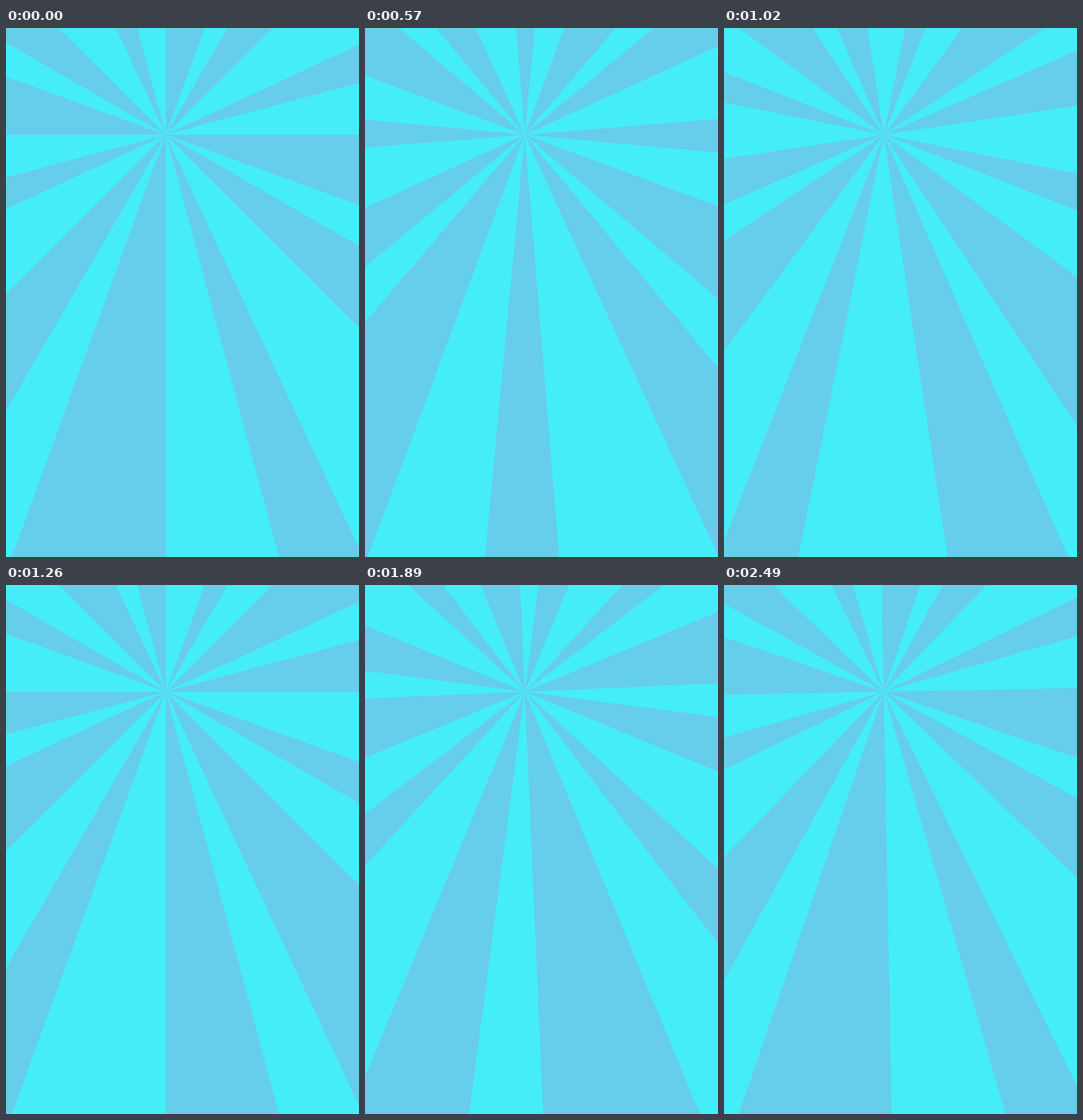
Recreate the animation shown at these times as an HTML page with a canvas. Size 611x917 px, loop 2.52 s.

```html
<!DOCTYPE html>
<html lang="en">
<head>
<meta charset="utf-8">
<title>Sunburst</title>
<style>
  html, body { margin: 0; width: 100%; height: 100%; overflow: hidden; background: #66cdeb; }
  canvas { display: block; }
</style>
</head>
<body>
<canvas id="stage" width="611" height="917"></canvas>
<script>
const ctx = document.getElementById('stage').getContext('2d');
const WIDTH = 611, HEIGHT = 917;
const CENTER = { x: 276.5, y: 185 };
const RADIUS = 1200;
const LOOP = 2520, STEP = 30;
const BLUE = '#66cdeb', CYAN = '#45edf8';

// Bright rays as [start, end] degrees; the set repeats every quarter turn.
const RAYS = [[20, 30], [45, 65], [75, 90]];
const QUARTER = 90;

const rad = degrees => degrees * Math.PI / 180;

function addRay(from, to) {
  ctx.moveTo(CENTER.x, CENTER.y);
  for (const angle of [rad(from), rad(to)]) {
    ctx.lineTo(CENTER.x + RADIUS * Math.cos(angle), CENTER.y + RADIUS * Math.sin(angle));
  }
  ctx.closePath();
}

function draw(time) {
  const turn = QUARTER * time / LOOP;
  ctx.fillStyle = BLUE;
  ctx.fillRect(0, 0, WIDTH, HEIGHT);
  ctx.fillStyle = CYAN;
  ctx.beginPath();
  for (let base = turn; base < turn + 360; base += QUARTER) {
    for (const [from, to] of RAYS) addRay(base + from, base + to);
  }
  ctx.fill();
}

const start = performance.now();

function tick() {
  const time = (performance.now() - start) % LOOP;
  draw(Math.floor(time / STEP) * STEP);
  requestAnimationFrame(tick);
}

tick();
</script>
</body>
</html>
```
